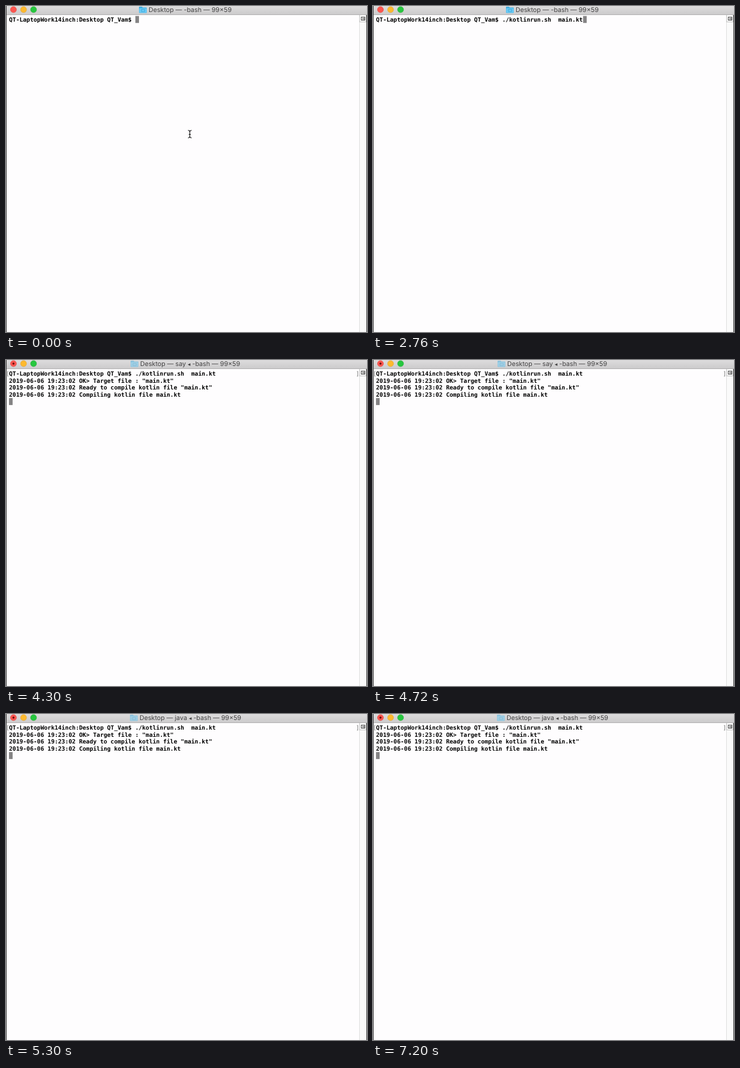
An HTML page that plays this animation: 600 by 542 pixels, repeating every 8000 ms.

```html
<!DOCTYPE html>
<html lang="en">
<head>
<meta charset="utf-8">
<title>Terminal</title>
<style>
  html, body { margin: 0; width: 100%; height: 100%; overflow: hidden; background: #fefdfe; }
  svg { display: block; width: 100%; height: 100%; }
  text { white-space: pre; text-rendering: geometricPrecision; }
  .mono { font: bold 9.69px "DejaVu Sans Mono", monospace; fill: #000; }
  .thin { font-weight: normal; fill: #777; }
  .title { font: 10.7px Inter, sans-serif; fill: #434243; }
  .mark { font-family: "DejaVu Sans", sans-serif; font-size: 9px; }
</style>
</head>
<body>
<svg viewBox="0 0 600 542">
  <defs>
    <linearGradient id="bar" x2="0" y2="1">
      <stop stop-color="#dddcdd"/>
      <stop offset="1" stop-color="#cccbcc"/>
    </linearGradient>
  </defs>
  <rect width="600" height="542" fill="#fefdfe"/>

  <rect x="587" y="15" width="12" height="527" fill="#fafafa"/>
  <path d="M587.5 15V542" stroke="#dedede"/>
  <rect x="587.5" y="14.5" width="11" height="12" fill="#f6f6f6" stroke="#c4c4c4"/>
  <rect x="590.5" y="18.5" width="6" height="5" fill="#fff" stroke="#4a4a4a"/>
  <path d="M592 20.5h4M592 22h4" stroke="#4a4a4a" stroke-width=".8"/>

  <rect width="600" height="14" fill="url(#bar)"/>
  <path d="M0 14.5H600" stroke="#b1b0b1"/>
  <path d="M.5 0V542M599.5 15V542" stroke="#3c3c3c"/>

  <g stroke-width=".6">
    <circle cx="12.4" cy="6" r="5" fill="#fc5650" stroke="#df4740"/>
    <circle cx="29.2" cy="6" r="5" fill="#fdb92e" stroke="#de9f34"/>
    <circle cx="45.8" cy="6" r="5" fill="#27c73f" stroke="#26a934"/>
  </g>
  <circle id="busy" cx="12.4" cy="6" r="1.8" fill="#6d0c08"/>

  <g id="folder">
    <path d="M1 .8H5L6.3 2H12Q13 2 13 3V10Q13 11 12 11H1Q0 11 0 10V1.8Q0 .8 1 .8Z" fill="#35a8de"/>
    <rect x=".3" y="3" width="12.4" height="7.8" rx=".8" fill="#6bcbf6"/>
    <path d="M4 5.2H9.5V8.8H4Z" fill="none" stroke="#3aa5d8" stroke-width=".8"/>
  </g>
  <text id="title" class="title" y="10"></text>

  <g id="lines" class="mono"></g>
  <g id="brackets" class="mono thin">
    <text x="0" y="25.5">[</text>
    <text x="581.5" y="25.5">]</text>
  </g>
  <rect id="cursor" width="6" height="11.6" fill="#858485"/>
  <path id="pointer" d="M302.5 206.8Q305.5 206.8 305.5 209Q305.5 206.8 308.5 206.8M305.5 208.5V217.5M303.8 213.5H307.2M302.5 219.2Q305.5 219.2 305.5 217Q305.5 219.2 308.5 219.2" fill="none" stroke="#111" stroke-width="1.1"/>
</svg>
<script>
const LOOP = 8000, ENTER = 600, RUN = 4200, BUSY = 4300, JAVA = 5300;
const LEFT = 5, TOP = 26, LINE = 11.67, CHAR = 5.834;
const PROMPT = 'QT-LaptopWork14inch:Desktop QT_Vam$ ';
const COMMAND = './kotlinrun.sh  main.kt';
const STAMP = '2019-06-06 19:23:02 ';
const OUTPUT = [
  'OK> Target file : "main.kt"',
  'Ready to compile kotlin file "main.kt"',
  'Compiling kotlin file main.kt'
];

const $ = id => document.getElementById(id);
const show = (id, on) => $(id).setAttribute('visibility', on ? 'visible' : 'hidden');

const rows = [PROMPT, ...OUTPUT.map(s => STAMP + s)].map((s, i) => {
  const row = document.createElementNS('http://www.w3.org/2000/svg', 'text');
  row.setAttribute('x', LEFT);
  row.setAttribute('y', TOP + i * LINE);
  row.textContent = s;
  $('lines').append(row);
  return row;
});

function setTitle(job, x) {
  const process = job ? `${job} <tspan class="mark">◂</tspan> -bash` : '-bash';
  $('title').innerHTML = `Desktop — ${process} — 99×59`;
  $('title').setAttribute('x', x);
  $('folder').setAttribute('transform', `translate(${x - 16} .5)`);
  $('folder').setAttribute('opacity', job ? .5 : 1);
}

let job;
function draw(t) {
  const running = t >= RUN;
  const first = PROMPT + (t >= ENTER ? COMMAND : '');
  rows.forEach((row, i) => row.setAttribute('visibility', !i || running ? 'visible' : 'hidden'));
  rows[0].textContent = first;
  $('cursor').setAttribute('x', LEFT + (running ? 0 : first.length * CHAR));
  $('cursor').setAttribute('y', 16.6 + (running ? rows.length * LINE : 0));
  show('brackets', running);
  show('busy', t >= BUSY);
  show('pointer', t < ENTER);

  const next = t < BUSY ? '' : t < JAVA ? 'say' : 'java';
  if (next !== job) {
    job = next;
    setTitle(job, { '': 237, say: 223, java: 222 }[job]);
  }
}

const start = performance.now();
function tick() {
  draw((performance.now() - start) % LOOP);
  requestAnimationFrame(tick);
}
draw(0);
requestAnimationFrame(tick);
</script>
</body>
</html>
```
